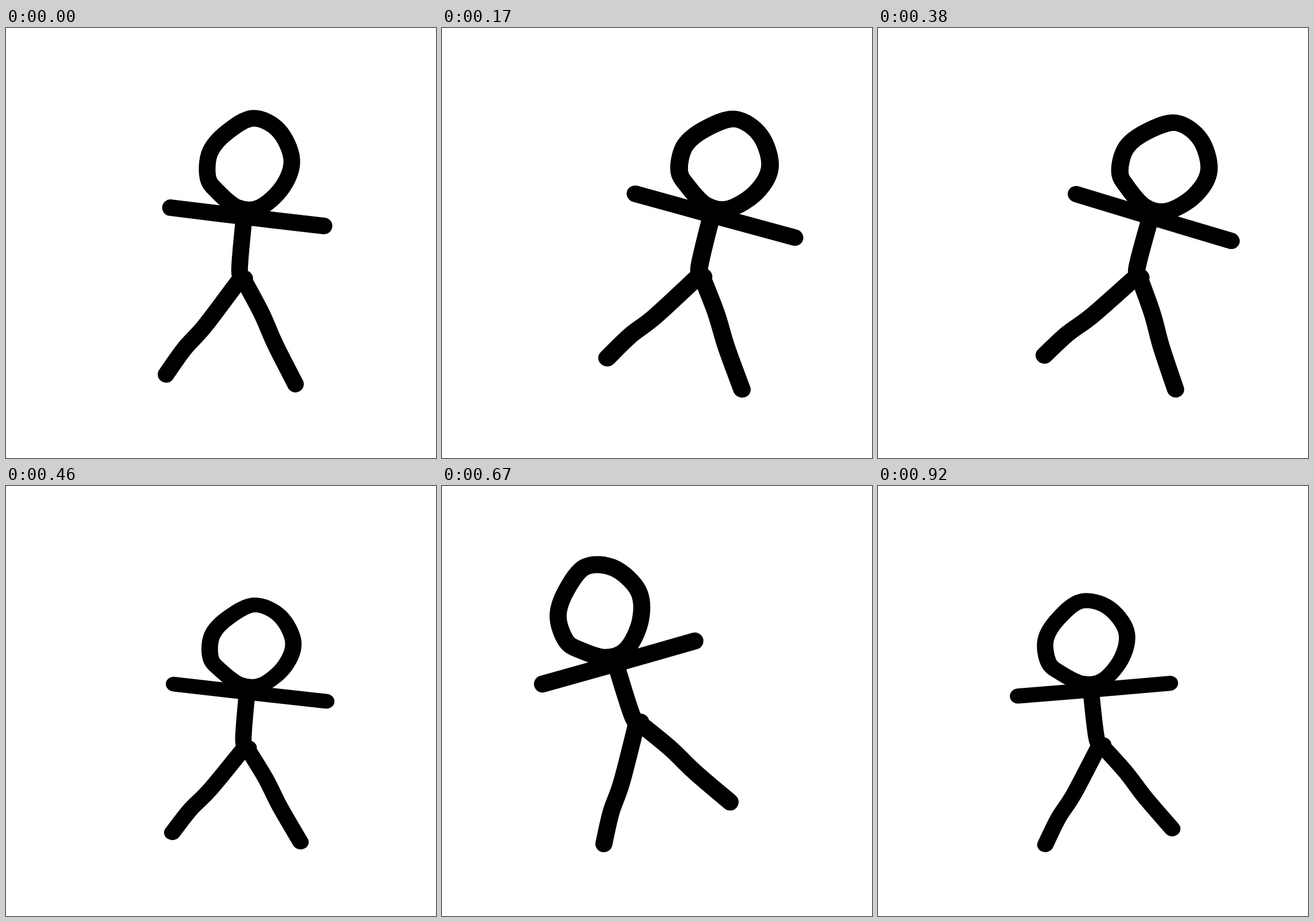
Animation of 748 by 748 pixels, one loop 0.96 s. Source, as an HTML page with a canvas:

```html
<!DOCTYPE html>
<html lang="en">
<head>
<meta charset="utf-8">
<title>Dancing stick figure</title>
<style>
  html, body { margin: 0; width: 100%; height: 100%; overflow: hidden; background: #fff; }
  canvas { display: block; }
</style>
</head>
<body>
<canvas id="stage" width="748" height="748"></canvas>
<script>
const ctx = document.getElementById('stage').getContext('2d');
const LOOP = 960;
const FRAMES = 23;
const STROKE = 29;
const REST = { lean: 6.2, x: 390.5, y: 613.5 };   // pose in which the figure is drawn

// Key points; curves are smoothed through them.
const head = [[351, 261], [355, 217], [385, 182], [430, 158], [474, 179],
  [497, 230], [481, 278], [441, 314], [403, 314], [368, 286]];
const arms = [[286, 314], [425, 331], [553, 346]];
const body = [[414, 330], [406, 424], [415, 438]];
const leftLeg = [[406, 440], [346, 520], [310, 560], [278, 605]];
const rightLeg = [[412, 438], [444, 498], [468, 553], [503, 622]];

const clamp = v => Math.max(0, Math.min(1, v));
const bump = u => Math.sin(Math.PI * clamp(u)) ** 2;

// First sway: drops in from a hop, then leans right.
function swayRight(t) {
  const tilt = clamp(Math.min(0.38 + t / 320, (505 - t) / 125));
  const pulse = bump(t / 520);
  const hop = clamp(1 - t / 80);
  const landing = bump(t / 160);
  return {
    lean: 16.2 * tilt,
    width: 0.975 + 0.125 * pulse + 0.025 * hop,
    stretch: 0.87 + 0.07 * tilt + 0.1 * hop + 0.02 * landing,
    x: 400 + 6 * pulse - 9 * hop,
    y: 613 - 14 * tilt ** 2 + 15 * landing
  };
}

// Second sway: leans left and comes back.
function swayLeft(t) {
  const tilt = clamp(Math.min(t - 540, LOOP - t) / 122);
  const pulse = bump((t - 540) / (LOOP - 540));
  return {
    lean: -16.4 * tilt,
    width: 0.98 + 0.065 * pulse,
    stretch: 0.875 + 0.123 * tilt,
    x: 403 - 17 * pulse,
    y: 613 - 27 * tilt ** 2
  };
}

// Catmull-Rom curve through the points.
function trace(points, closed = false) {
  const n = points.length;
  const at = i => points[closed ? (i + n) % n : Math.max(0, Math.min(n - 1, i))];
  const handle = (i, axis, side) => at(i)[axis] + side * (at(i + 1)[axis] - at(i - 1)[axis]) / 6;
  ctx.beginPath();
  ctx.moveTo(...at(0));
  for (let i = 0; i < (closed ? n : n - 1); i++) {
    ctx.bezierCurveTo(handle(i, 0, 1), handle(i, 1, 1),
      handle(i + 1, 0, -1), handle(i + 1, 1, -1), ...at(i + 1));
  }
  ctx.stroke();
}

function draw(t) {
  const pose = t < 520 ? swayRight(t) : swayLeft(t);
  ctx.resetTransform();
  ctx.fillStyle = '#fff';
  ctx.fillRect(0, 0, 748, 748);
  ctx.translate(pose.x, pose.y);
  ctx.rotate(pose.lean * Math.PI / 180);
  ctx.scale(pose.width, pose.width * pose.stretch);
  ctx.rotate(-REST.lean * Math.PI / 180);
  ctx.translate(-REST.x, -REST.y);
  ctx.strokeStyle = '#000';
  ctx.lineWidth = STROKE;
  ctx.lineCap = ctx.lineJoin = 'round';
  trace(head, true);
  [arms, body, leftLeg, rightLeg].forEach(limb => trace(limb));
}

// Start of a frame at 24 per second, rounded to 10 ms.
const frameStart = n => Math.round(n * 100 / 24) * 10;

function heldTime(t) {
  let n = FRAMES - 1;
  while (frameStart(n) > t) n--;
  return frameStart(n);
}

const start = performance.now();
function tick() {
  draw(heldTime((performance.now() - start) % LOOP));
  requestAnimationFrame(tick);
}
tick();
</script>
</body>
</html>
```
